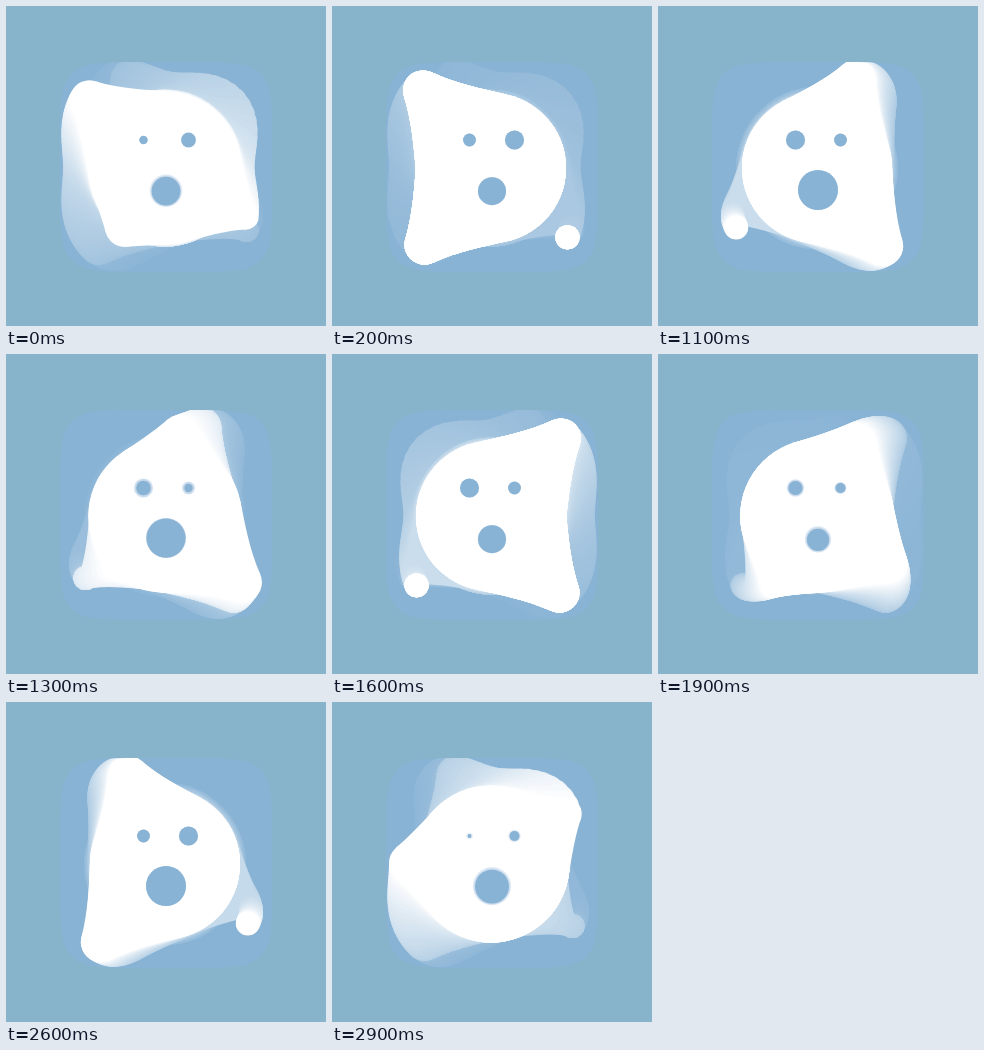
An HTML page with a canvas for the animation above (3000 ms loop, 320 px wide and 320 px high).

```html
<!DOCTYPE html>
<html>
<head>
<meta charset="utf-8">
<style>
html, body { margin: 0; width: 100%; height: 100%; overflow: hidden; background: #87b4cb; }
canvas { display: block; width: 320px; height: 320px; }
</style>
</head>
<body>
<canvas id="stage" width="320" height="320"></canvas>
<script>
const ctx = document.getElementById('stage').getContext('2d');
const LOOP = 3000, HALF = LOOP / 2, START = 700;
const TAU = Math.PI * 2, DEG = Math.PI / 180;
const BG = '#87b4cb', HAZE = [137, 179, 213];
const CX = 160, CY = 161, BODY_X = 159, BODY_Y = 162;

const mix = (a, b, k) => a + (b - a) * k;
const smooth = (a, b, t) => {
  const k = Math.min(1, Math.max(0, (t - a) / (b - a)));
  return k * k * (3 - 2 * k);
};
const polar = (x, y, a, r) => [x + Math.cos(a) * r, y + Math.sin(a) * r];

// Each ball swings between two angles while its size changes;
// dip is how far it sinks towards the body on the way
const balls = [
  { from: 131, to: 228, r0: 20, r1: 20, dip: 3 },
  { from: 248, to: 403, r0: 20, r1: 12, dip: 12 },
  { from: 38, to: 131, r0: 12, r1: 20, dip: 60 }
];

// Balls come out, change places, go back in; every other time flipped
function pose(t) {
  const half = Math.floor((t - START) / HALF);
  const s = t - START - half * HALF;
  const side = half % 2 ? 1 : -1;
  const open = smooth(0, 350, s) * (1 - smooth(1050, 1450, s));
  const turn = smooth(550, 850, s);
  const mid = 1 - (2 * turn - 1) ** 4;
  const swing = 28 * (smooth(100, 450, s) - 1 + smooth(1000, 1400, s));
  return { side, open, turn, mid, swing };
}

function disc(x, y, r) {
  ctx.beginPath();
  ctx.arc(x, y, r, 0, TAU);
  ctx.fill();
}

// Gooey neck between the body and a ball
function neck(x1, y1, r1, x2, y2, r2, v = 0.93) {
  const d = Math.hypot(x2 - x1, y2 - y1);
  if (d <= r1 - r2 || d > r1 + r2 * 1.7) return;
  let u1 = 0, u2 = 0;
  if (d < r1 + r2) {
    u1 = Math.acos((r1 * r1 + d * d - r2 * r2) / (2 * r1 * d));
    u2 = Math.acos((r2 * r2 + d * d - r1 * r1) / (2 * r2 * d));
  }
  const dir = Math.atan2(y2 - y1, x2 - x1), tan = Math.acos((r1 - r2) / d);
  const s1 = mix(u1, tan, v), s2 = mix(Math.PI - u2, tan, v);
  const p1 = polar(x1, y1, dir + s1, r1), p2 = polar(x2, y2, dir + s2, r2);
  const q1 = polar(x1, y1, dir - s1, r1), q2 = polar(x2, y2, dir - s2, r2);
  const reach = Math.hypot(p1[0] - p2[0], p1[1] - p2[1]) / 3, q = Math.PI / 2;
  ctx.beginPath();
  ctx.moveTo(...p1);
  ctx.bezierCurveTo(...polar(...p1, dir + s1 - q, reach), ...polar(...p2, dir + s2 + q, reach), ...p2);
  ctx.lineTo(...q2);
  ctx.bezierCurveTo(...polar(...q2, dir - s2 - q, reach), ...polar(...q1, dir - s1 + q, reach), ...q1);
  ctx.fill();
}

function body(t) {
  const { side, open, turn, mid, swing } = pose(t);
  const size = 81 - 6 * open * (1 - 0.6 * mid);
  disc(BODY_X, BODY_Y, size);
  for (const ball of balls) {
    const a = (mix(ball.from, ball.to, turn) + swing) * DEG;
    const square = 86 * (1 + 0.2 * Math.sin(2 * a) ** 2);
    const [x, y] = polar(0, 0, a, square * mix(0.5, 1, open) - ball.dip * mid);
    const r = mix(ball.r0, ball.r1, turn);
    disc(CX + side * x, CY + y, r);
    neck(BODY_X, BODY_Y, size, CX + side * x, CY + y, r);
  }
}

function face(t) {
  const { side, open, turn, mid } = pose(t);
  const eye = grow => Math.max(1.5, 2 + grow * open - 4.5 * mid);
  const mouth = 5 + open * (15 - 6 * turn);
  disc(CX - 22.5 * side, 134, eye(4.4));
  disc(CX + 22.5 * side, 134, eye(7.5));
  disc(CX, 188 - mouth * 0.2, mouth);
}

// Everything outside the rounded square that the balls sweep
const outside = new Path2D();
outside.rect(0, 0, 320, 320);
for (let i = 0; i < 120; i++) {
  const a = i / 120 * TAU, bend = v => Math.sign(v) * Math.abs(v) ** (1 / 3);
  const x = CX + 106 * bend(Math.cos(a)), y = CY + 105 * bend(Math.sin(a));
  i ? outside.lineTo(x, y) : outside.moveTo(x, y);
}
outside.closePath();

const haze = white => `rgb(${HAZE.map(c => Math.round(mix(c, 255, white)))})`;

function draw(t) {
  ctx.fillStyle = haze(0);
  ctx.fillRect(0, 0, 320, 320);

  // Fading trail of the recent past
  for (let age = 600; age >= 0; age -= 6) {
    ctx.fillStyle = haze(Math.exp(-age / 150));
    body(t - age);
  }

  ctx.fillStyle = haze(0);
  ctx.globalAlpha = 0.1;
  for (let age = 90; age > 0; age -= 15) face(t - age);
  ctx.globalAlpha = 1;
  face(t);

  ctx.fillStyle = BG;
  ctx.fill(outside, 'evenodd');
}

function tick() {
  draw(performance.now() % LOOP);
  requestAnimationFrame(tick);
}
tick();
</script>
</body>
</html>
```
